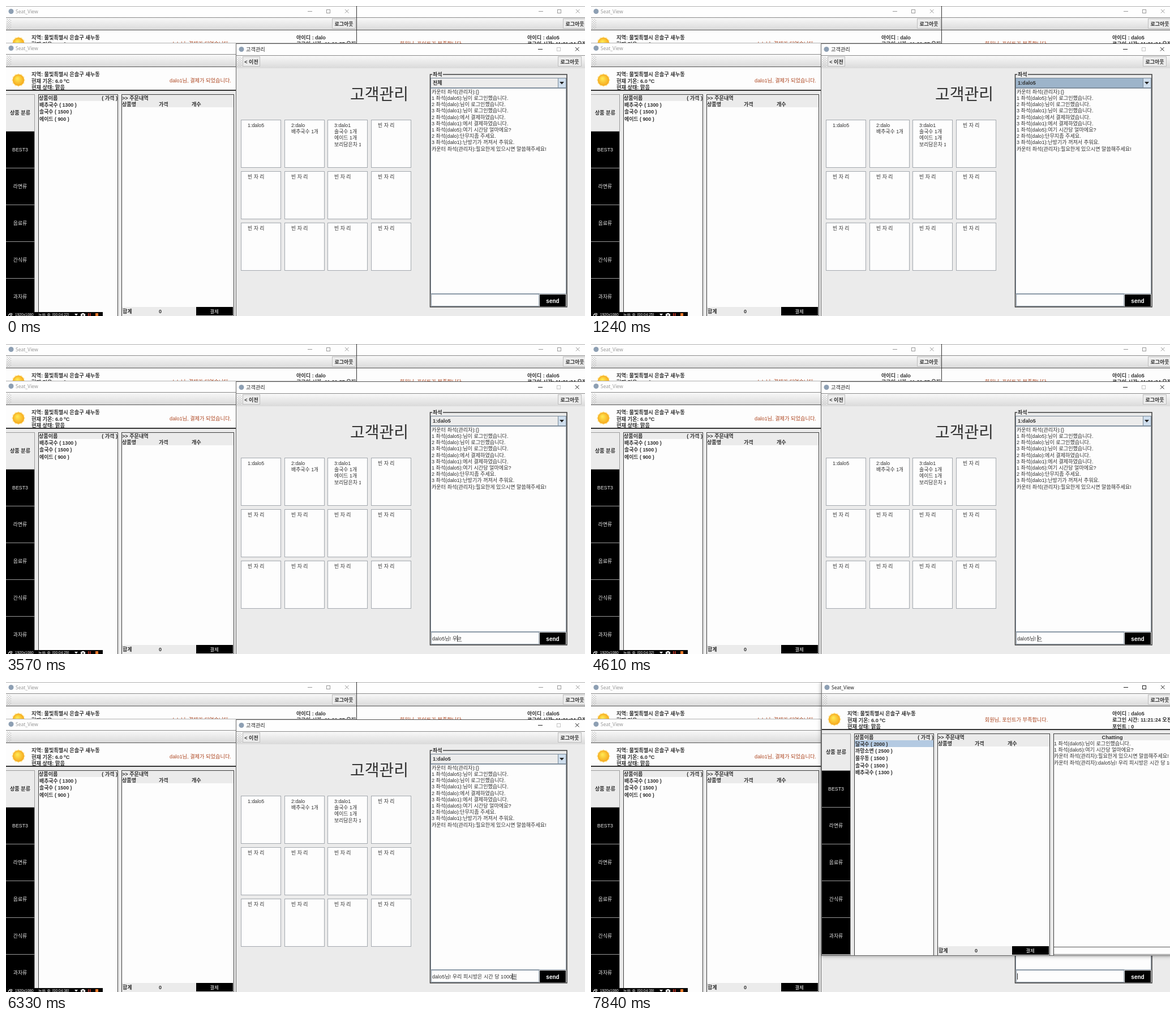
An HTML page with a canvas that plays this animation: 1023 by 548 pixels, repeating every 8000 ms.

```html
<!DOCTYPE html>
<html lang="ko">
<head>
<meta charset="utf-8">
<style>
html, body { margin: 0; width: 1023px; height: 548px; overflow: hidden; background: #ebebeb; }
canvas { display: block; }
</style>
</head>
<body>
<canvas id="stage" width="1023" height="548"></canvas>
<script>
const LOOP = 8000, SENT = 6820, SWITCH = 7750;
const ctx = document.getElementById('stage').getContext('2d');
const BODY = '#ebebeb', WHITE = '#fdfdfd', INK = '#303030', LINE = '#3c3c3c';
const UI = '"Liberation Sans", "Noto Sans CJK KR", sans-serif';
const TITLE = '"Noto Sans", "Noto Sans CJK KR", sans-serif';

function rect(x, y, w, h, color) {
  ctx.fillStyle = color;
  ctx.fillRect(x, y, w, h);
}

function box(x, y, w, h, fill, border) {
  rect(x, y, w, h, border);
  rect(x + 1, y + 1, w - 2, h - 2, fill);
}

// y is the optical middle of the line
function text(str, x, y, { size = 9.1, weight = 400, color = INK, align = 'left', family = UI } = {}) {
  ctx.font = `${weight} ${size}px ${family}`;
  ctx.textAlign = align;
  ctx.fillStyle = color;
  ctx.fillText(str, x, y + size * 0.36);
}
const bold = (str, x, y, opts) => text(str, x, y, { weight: 700, ...opts });

function lines(list, x, y, pitch, opts) {
  list.forEach((str, i) => text(str, x, y + i * pitch, opts));
}

function clipped(x, y, w, h, draw) {
  ctx.save();
  ctx.beginPath();
  ctx.rect(x, y, w, h);
  ctx.clip();
  draw();
  ctx.restore();
}

function path(points, color, fill) {
  ctx.beginPath();
  points.forEach(([x, y], i) => i % 2 || fill ? ctx.lineTo(x, y) : ctx.moveTo(x, y));
  ctx.fillStyle = ctx.strokeStyle = color;
  ctx.lineWidth = 1;
  fill ? ctx.fill() : ctx.stroke();
}

function disc(x, y, r, color) {
  ctx.beginPath();
  ctx.arc(x, y, r, 0, 7);
  ctx.fillStyle = color;
  ctx.fill();
}

function titleBar(x, y, name, color, maxColor = color) {
  rect(x, y, 619, 20, '#fefefe');
  disc(x + 9, y + 9.5, 4.5, '#8d9fb3');
  text(name, x + 17, y + 9.5, { size: name === '고객관리' ? 9.2 : 8.5, color, family: TITLE });
  rect(x + 533, y + 9, 8, 1, color);
  ctx.strokeStyle = maxColor;
  ctx.lineWidth = 1;
  ctx.strokeRect(x + 566.5, y + 6.5, 6, 6);
  path([[x + 599, y + 6], [x + 605.5, y + 12.5], [x + 605.5, y + 6], [x + 599, y + 12.5]], color);
}

function toolBar(x, y, h) {
  const g = ctx.createLinearGradient(0, y, 0, y + h);
  g.addColorStop(0, '#fafafa');
  g.addColorStop(1, '#dadada');
  rect(x, y, 619, h, g);
  rect(x, y, 619, 1, '#888');
  for (let r = 0; r < 9; r++)
    for (let c = 0; c < 2; c++) rect(x + 2 + c * 4 + (r % 2) * 2, y + 3 + r * 2, 1, 1, '#a8a8a8');
}

function toolButton(label, x, y, w) {
  box(x, y, w, 18, '#ececec', '#bdbdbd');
  bold(label, x + w / 2, y + 9.5, { align: 'center', size: 9 });
}

function sun(x, y) {
  for (let i = 0; i < 12; i++) {
    const a = i * Math.PI / 6;
    disc(x + 10 * Math.cos(a), y + 10 * Math.sin(a), 2, '#ffeeb0');
  }
  const g = ctx.createRadialGradient(x - 2, y - 3, 1, x, y, 11);
  g.addColorStop(0, '#ffe650');
  g.addColorStop(1, '#f5a51b');
  disc(x, y, 10.2, g);
}

function seatWindow(x, y, { id, time, message, goods, selected, chat, active }) {
  const shade = active ? '#222' : '#999';
  rect(x, y, 619, 484, BODY);
  titleBar(x, y, 'Seat_View', shade);
  toolBar(x, y + 20, 22);
  toolButton('로그아웃', x + 576, y + 22, 42);
  rect(x, y + 42, 619, 42, WHITE);
  rect(x, y + 42, 619, 1, '#555');
  rect(x, y + 83, 619, 2, '#333');
  sun(x + 22, y + 66);
  ['지역: 물빛특별시 은솔구 새누동', '현재 기온: 6.0 ºC', '현재 상태: 맑음']
    .forEach((s, i) => bold(s, x + 45, y + 56 + i * 11.2, { size: 9.2 }));
  text(message, x + 343.5, y + 66.5, { size: 9.2, color: '#ad451f', align: 'center' });
  [`아이디 : ${id}`, `로그인 시간: ${time} 오전`, '포인트 : 0']
    .forEach((s, i) => bold(s, x + 513, y + 56 + i * 11.2));

  rect(x, y + 91, 51, 392, '#9a9a9a');
  rect(x, y + 92, 50, 64, BODY);
  bold('상품 분류', x + 25, y + 124, { align: 'center' });
  ['BEST3', '라면류', '음료류', '간식류', '과자류'].forEach((s, i) => {
    rect(x, y + 157 + i * 65, 50, 64, '#000');
    text(s, x + 25, y + 189 + i * 65, { color: '#e4e4e4', align: 'center', size: 8.8 });
  });

  box(x + 57, y + 91, 141, 393, WHITE, LINE);
  rect(x + 58, y + 92, 139, 11, BODY);
  bold('상품이름', x + 58, y + 98);
  bold('( 가격 )', x + 197, y + 98, { align: 'right' });
  goods.forEach((s, i) => {
    if (s === selected) rect(x + 58, y + 103, 139, 12, '#b4cae2');
    bold(s, x + 59, y + 109.5 + i * 12.6, { size: 8.9 });
  });

  box(x + 204, y + 91, 199, 393, WHITE, LINE);
  rect(x + 205, y + 92, 197, 22, BODY);
  bold('>> 주문내역', x + 205, y + 98);
  bold('상품명', x + 205, y + 109);
  bold('가격', x + 270, y + 109);
  bold('개수', x + 328, y + 109);
  rect(x + 205, y + 467, 197, 16, BODY);
  bold('합계', x + 206, y + 475);
  bold('0', x + 270, y + 475);
  rect(x + 336, y + 467, 65, 15, '#000');
  text('결제', x + 368, y + 475, { color: '#eee', align: 'center', size: 8.5 });

  box(x + 409, y + 91, 210, 393, WHITE, LINE);
  rect(x + 410, y + 92, 208, 11, BODY);
  bold('Chatting', x + 513, y + 98, { align: 'center' });
  lines(chat, x + 410, y + 109, 11.1);
  rect(x + 410, y + 468, 208, 1, '#555');
  rect(x + 410, y + 481, 208, 1, '#777');
  rect(x, y, 619, 1, '#b0b0b0');
  rect(x + 619, y, 1, 484, '#333');
  rect(x, y + 483, 619, 1, '#666');
}

// Keyboard states of a text, syllables being composed letter by letter
const INITIALS = 'ㄱㄲㄴㄷㄸㄹㅁㅂㅃㅅㅆㅇㅈㅉㅊㅋㅌㅍㅎ';
const isHangul = c => /[ㄱ-ㅎ가-힣]/.test(c);

function keystrokes(char) {
  const code = char.charCodeAt(0) - 0xac00;
  if (code < 0) return [char];
  const tail = code % 28, open = code - tail, vowel = open % 588 / 28;
  const syllable = n => String.fromCharCode(0xac00 + n);
  const states = [INITIALS[Math.floor(code / 588)]];
  if (vowel === 14) states.push(syllable(open - 28));
  states.push(syllable(open));
  if (tail) states.push(char);
  return states;
}

const typed = [{ at: 0, str: '' }];
const current = () => typed[typed.length - 1].str;

function type(at, step, str) {
  for (const char of str) {
    const base = current();
    for (const state of keystrokes(char)) {
      typed.push({ at, str: base + state });
      at += step;
    }
  }
}

function erase(at, step, count) {
  const back = typed.slice(-count - 1, -1).reverse();
  back.forEach(({ str }, i) => typed.push({ at: at + i * step, str }));
}

type(1720, 45, 'dalo');
type(2060, 1, '5');
type(2590, 50, '님');
type(2880, 1, '!');
type(3190, 50, ' 우');
type(3520, 80, '리');
erase(4120, 65, 4);
type(4600, 42, '우리 피시방은');
type(5290, 50, ' 시간');
type(5730, 48, ' 당 1000원');
type(6390, 45, ' 입니다.');
typed.push({ at: SENT, str: '' });

const REPLY = '카운터 좌석(관리자):dalo5님! 우리 피시방은 시간 당 1000원 입니다.';
const NOTICE = '카운터 좌석(관리자):필요한게 있으시면 말씀해주세요!';
const LOG = ['카운터 좌석(관리자):{}', '1 좌석(dalo5):님이 로그인했습니다.', '2 좌석(dalo):님이 로그인했습니다.',
  '3 좌석(dalo1):님이 로그인했습니다.', '2 좌석(dalo):에서 결제하였습니다.', '3 좌석(dalo1):에서 결제하였습니다.',
  '1 좌석(dalo5):여기 시간당 얼마에요?', '2 좌석(dalo):단무지좀 주세요.', '3 좌석(dalo1):난방기가 꺼져서 추워요.', NOTICE];
const SEATS = [['1:dalo5'], ['2:dalo', '배추국수 1개'], ['3:dalo1', '솔국수 1개', '에이드 1개', '보리담은차 1개']];
const CHOICES = ['전체', '1:dalo5', '2:dalo', '3:dalo1'];

function messageField(t) {
  box(751, 509, 191, 22, WHITE, '#8a98a6');
  const str = typed.filter(k => k.at <= t).pop().str;
  text(str, 753, 521);
  const composing = str && isHangul(str.slice(-1));
  const caret = 753 + ctx.measureText(composing ? str.slice(0, -1) : str).width;
  if (composing) rect(caret, 525, ctx.measureText(str.slice(-1)).width, 1, '#888');
  const focused = t < 470 || t > 1480;
  const busy = t > 1700 && t < SENT;
  const lit = t >= 30 && (t - 30) % 480 < 240;
  if (focused && (busy || lit)) rect(Math.round(caret), 515, 1, 11, '#222');
}

function comboBox(t) {
  const chosen = t >= 1200, open = t >= 480 && !chosen;
  box(750, 127, 240, 18, chosen && t < 1300 ? '#9db4ca' : '#ececec', '#7a8a99');
  bold(CHOICES[+chosen], 754, 136);
  box(975, 127, 15, 18, '#cfdeed', '#7a8a99');
  path([[978, 134], [986, 134], [982, 138.5]], '#222', true);
  if (!open) return;
  box(750, 145, 240, 54, '#ececec', '#7a8a99');
  const hover = t < 640 ? 0 : 1;
  rect(751, 146 + hover * 13, 238, 13, '#a3b8cc');
  CHOICES.forEach((s, i) => bold(s, 753, 152.5 + i * 13));
}

function adminWindow(t) {
  rect(406, 66, 617, 482, BODY);
  titleBar(407, 67, '고객관리', '#222', '#c4c4c4');
  toolBar(407, 87, 23);
  toolButton('< 이전', 418, 89, 31);
  toolButton('로그아웃', 975, 89, 42);
  text('고객관리', 608, 156, { size: 28, weight: 300 });

  for (let i = 0; i < 12; i++) {
    const x = Math.round(415 + i % 4 * 76.7), y = 201 + Math.floor(i / 4) * 91;
    box(x, y, 71, 85, WHITE, '#a3a8ae');
    clipped(x, y, 59, 84, () => lines(SEATS[i] || ['빈 자 리'], x + 12, y + 10, 11.1, { size: 8.9 }));
  }

  ctx.strokeStyle = LINE;
  ctx.lineWidth = 1.5;
  ctx.strokeRect(749.5, 121, 241.5, 411);
  rect(753, 116, 19, 9, BODY);
  bold('좌석', 754, 121, { size: 9 });
  box(750, 145, 240, 364, WHITE, '#8a98a6');
  clipped(751, 146, 238, 362, () => lines(t < SENT ? LOG : [...LOG, REPLY], 752, 151.5, 11.2));
  comboBox(t);
  messageField(t);
  rect(943, 510, 46, 21, '#000');
  bold('send', 966, 521, { size: 10, color: '#fff', align: 'center' });
  rect(406, 66, 617, 1, '#555');
  rect(406, 66, 1, 482, '#666');
}

// Moments at which the recorder clock advances
const TICKS = [250, 700, 1200, 1740, 2150, 2600, 3200, 3600, 4130, 4490, 4950, 5240, 5800, 6300, 6700, 7200, 7760];

function recorder(t) {
  const seconds = 22 + TICKS.filter(at => at <= t).length;
  const white = { size: 6.6, color: '#f2f2f2' };
  rect(0, 541, 171, 7, '#050505');
  box(6, 543, 5, 4, '#050505', '#ddd');
  box(4, 545, 5, 4, '#050505', '#ddd');
  text('1920x1080', 16, 546, white);
  text('녹화 중', 57, 546, { ...white, size: 7.2 });
  text(`[00:04:${seconds}]`, 82, 546, white);
  path([[121, 544], [127, 544], [124, 547.5]], '#fff', true);
  rect(132, 544, 8, 4, '#fff');
  rect(134, 543, 4, 1, '#fff');
  disc(136, 546.5, 1.3, '#222');
  rect(145, 543, 1.5, 5, '#d33a2c');
  rect(148, 543, 1.5, 5, '#d33a2c');
  rect(158, 543, 5, 5, '#e8792b');
}

const cheapMeals = ['배추국수 ( 1300 )', '솔국수 ( 1500 )', '에이드 ( 900 )'];
const back = { id: 'dalo', time: '11:20:57', message: 'dalo님, 결제가 되었습니다.', goods: cheapMeals, chat: [] };
const left = { ...back, id: 'dalo1', message: 'dalo1님, 결제가 되었습니다.' };
const right = {
  id: 'dalo5', time: '11:21:24', message: '회원님, 포인트가 부족합니다.',
  goods: ['달국수 ( 2000 )', '까망소면 ( 2500 )', '물우동 ( 1500 )', '솔국수 ( 1500 )', '배추국수 ( 1300 )'],
  selected: '달국수 ( 2000 )',
  chat: [LOG[1], LOG[6], NOTICE, REPLY]
};

function raiseRight() {
  ctx.save();
  ctx.shadowColor = 'rgba(0,0,0,.4)';
  ctx.shadowBlur = 7;
  rect(407, 0, 620, 484, '#777');
  ctx.restore();
  seatWindow(408, 0, { ...right, active: true });
}

function draw(t) {
  seatWindow(408, 0, right);
  seatWindow(0, 0, back);
  seatWindow(0, 65, left);
  adminWindow(t);
  if (t >= SWITCH) raiseRight();
  recorder(t);
}

const start = performance.now();
function tick() {
  draw((performance.now() - start) % LOOP);
  requestAnimationFrame(tick);
}
tick();
</script>
</body>
</html>
```
